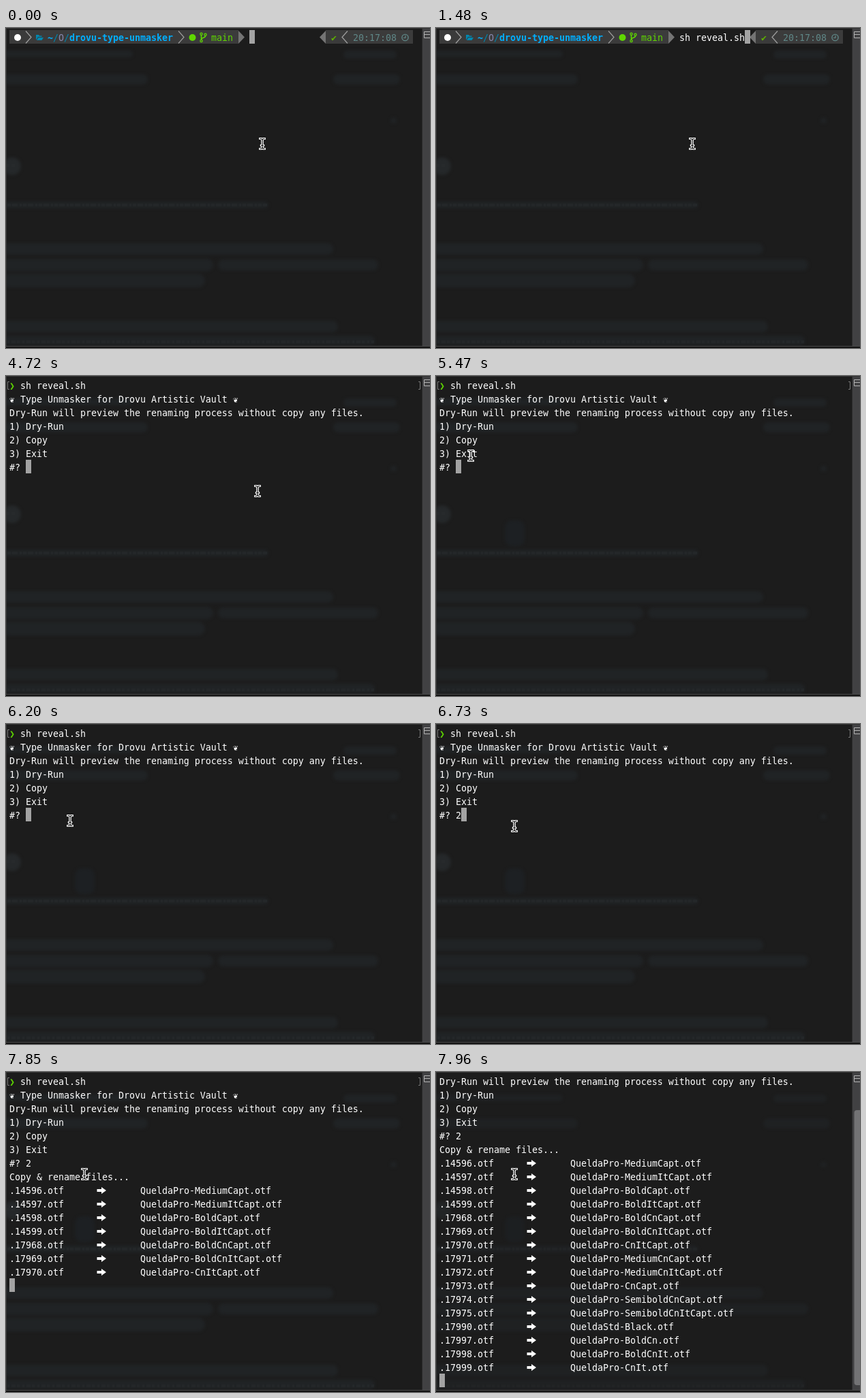
Write an HTML page that moves like this. It is 622 px wide and 470 px high and loops after 8 s.

```html
<!DOCTYPE html>
<html lang="en">
<head>
<meta charset="utf-8">
<title>Terminal session</title>
<style>
  html, body { margin: 0; width: 100%; height: 100%; overflow: hidden; background: #1c1c1c; }
  svg { display: block; width: 622px; height: 470px; }
  text { font: 13.29px "DejaVu Sans Mono", "Liberation Mono", monospace; white-space: pre; }
  .bold { font-weight: bold; }
  .leaf { font-size: 12px; }
  .blur { filter: blur(2px); }
</style>
</head>
<body>
<svg viewBox="0 0 622 470" xmlns="http://www.w3.org/2000/svg">
  <rect width="622" height="470" fill="#1c1c1c"/>
  <g id="haze"></g>
  <g id="screen"></g>
  <g id="bar">
    <rect x="610" width="12" height="470" fill="#414143"/>
    <path d="M610.5 0V467" stroke="#2b2b2c"/>
    <rect id="thumb" x="613.5" y="56" width="12" height="404" rx="4" fill="#737375"/>
    <path d="M622 5.5H613.5V14.5H622M613.5 9.5H622" fill="none" stroke="#b4b4b4"/>
  </g>
  <path d="M.5 0V467M0 .5H622" stroke="#343434" fill="none"/>
  <path d="M0 467.5H622" stroke="#4c4c4c"/>
  <rect y="468" width="622" height="2" fill="#121212"/>
  <g id="mouse" fill="none" stroke-linecap="square">
    <path id="beam" d="M-3-7.5Q0-7.5 0-5Q0-7.5 3-7.5M0-5V5M-3 7.5Q0 7.5 0 5Q0 7.5 3 7.5M-1.5 2.5H1.5" stroke="#fff" stroke-width="3.2"/>
    <use href="#beam"/>
    <path d="M-3-7.5Q0-7.5 0-5Q0-7.5 3-7.5M0-5V5M-3 7.5Q0 7.5 0 5Q0 7.5 3 7.5M-1.5 2.5H1.5" stroke="#151515" stroke-width="1.2"/>
  </g>
</svg>
<script>
const LOOP = 8000, COL = 8, ROW = 20, ROWS = 23;
const $ = id => document.getElementById(id);
const esc = s => s.replace(/&/g, '&amp;').replace(/</g, '&lt;');

const colX = col => 5 + col * COL;
const text = (col, row, s, fill = '#fff', cls = '') =>
  `<text x="${colX(col)}" y="${19 + row * ROW}" fill="${fill}" class="${cls}">${esc(s)}</text>`;
const cursor = (col, row) =>
  `<rect x="${colX(col)}" y="${3 + row * ROW}" width="8" height="20" fill="#a3a3a3"/>`;
const line = (d, stroke, w = 1.2) =>
  `<path d="${d}" fill="none" stroke="${stroke}" stroke-width="${w}"/>`;
const shape = (d, fill) => `<path d="${d}" fill="${fill}"/>`;

// Blurred window behind the terminal: x, y, width, height
const smudges = [
  [-4, 33, 190, 10], [495, 33, 78, 12], [-4, 68, 212, 15], [480, 68, 98, 15],
  [564, 132, 9, 8], [-6, 255, 391, 10], [-6, 316, 486, 17], [-6, 339, 310, 18],
  [311, 340, 235, 16], [-6, 361, 298, 20], [-6, 430, 493, 17], [-6, 452, 547, 14]
];
const smudge = ([x, y, w, h]) =>
  `<rect x="${x}" y="${y}" width="${w}" height="${h}" rx="${h / 2}"/>`;
$('haze').innerHTML =
  `<g class="blur" fill="#202325">${smudges.map(smudge).join('')}
   <circle cx="9" cy="203" r="13" fill="#25282a"/>
   <rect id="spot" x="101" y="212" width="29" height="38" rx="10" fill="#1d2023"/></g>
   <g fill="none" stroke="#292c2e" stroke-width="4" opacity=".55">
   <path d="M2 260H383" stroke-dasharray="5 2 8 3 3 2"/>
   <path d="M2 461H540" stroke-dasharray="3 3 6 2 4 4"/>
   <path d="M0 202H13" stroke-dasharray="5 3"/></g>`;

const BAR = '#3b3b3b', TIP = '#747474', SEP = '#a0a0a0';
const BLUE = '#0087af', SKY = '#00afff', GREEN = '#5fd700', TEAL = '#5f8787';
const prompt = [
  `<rect x="5" y="3" width="336" height="20" fill="${BAR}"/>`,
  `<rect x="469" y="3" width="128" height="20" fill="${BAR}"/>`,
  shape('M341 4L350 13.5L341 23Z', TIP),
  shape('M469 4L460 13.5L469 23Z', TIP),
  '<circle cx="17" cy="14" r="5" fill="#fff"/>',
  line('M29 4.5L37 13.5L29 22.5M253 4.5L261 13.5L253 22.5M501 4.5L493 13.5L501 22.5', SEP),
  shape('M44 17V10H48L49 11.5H52.5V13H47L44.5 17ZM45 18L47.5 14H55L52.5 18Z', BLUE),
  text(7, 0, '~', SKY, 'bold'), text(8, 0, '/', BLUE),
  text(9, 0, 'O', '#8787af'), text(10, 0, '/', BLUE),
  text(11, 0, 'drovu-type-unmasker', SKY, 'bold'),
  `<circle cx="273.5" cy="14" r="5" fill="${GREEN}"/>`,
  line('M286.5 9.5V18.5M292.5 10.5V11.5Q292.5 13.5 289 14.5Q286.5 15.2 286.5 17', GREEN, 1.6),
  `<g fill="${BAR}" stroke="${GREEN}" stroke-width="1.3"><circle cx="286.5" cy="8.7" r="1.6"/>
   <circle cx="292.5" cy="9.7" r="1.6"/><circle cx="286.5" cy="19" r="1.6"/></g>`,
  text(37, 0, 'main', GREEN),
  text(59, 0, '✔', '#5faf00'),
  text(63, 0, '20:17:08', TEAL),
  `<circle cx="585.5" cy="14" r="4.6" fill="none" stroke="${TEAL}" stroke-width="1.4"/>`,
  line('M586 11V14.5H583', TEAL)
].join('');

const command = 'sh reveal.sh';
const typing = [[420, 1], [470, 2], [710, 3], [880, 4], [1480, 12]];

function promptView(t) {
  let n = 0;
  for (const [at, count] of typing) if (t >= at) n = count;
  let out = prompt + text(44, 0, command.slice(0, n)) + cursor(44 + n, 0);
  if (n && n < command.length) {
    out += text(44 + n, 0, command[n], '#303030') +
      text(45 + n, 0, command.slice(n + 1), '#6a6a6a');
  }
  return out;
}

const fonts = `14596 Pro-MediumCapt,14597 Pro-MediumItCapt,14598 Pro-BoldCapt,
14599 Pro-BoldItCapt,17968 Pro-BoldCnCapt,17969 Pro-BoldCnItCapt,17970 Pro-CnItCapt,
17971 Pro-MediumCnCapt,17972 Pro-MediumCnItCapt,17973 Pro-CnCapt,
17974 Pro-SemiboldCnCapt,17975 Pro-SemiboldCnItCapt,17990 Std-Black,
17997 Pro-BoldCn,17998 Pro-BoldCnIt,17999 Pro-CnIt`
  .split(',').map(s => s.trim().split(' '));

const arrow = row =>
  shape(`M133.5 ${12 + row * ROW}h6.5v-3l7 5l-7 5v-3h-6.5z`, '#fff');

const menu = [
  row => line('M5 8.5H2.5V19.5H5M605 8.5H607.5V19.5H605', '#777', 1) +
    text(0, row, '❯', GREEN, 'bold') + text(2, row, command),
  row => text(0, row, '❦', '#fff', 'leaf') + text(41, row, '❦', '#fff', 'leaf') +
    text(2, row, 'Type Unmasker for Drovu Artistic Vault'),
  ...['Dry-Run will preview the renaming process without copy any files.',
    '1) Dry-Run', '2) Copy', '3) Exit'].map(s => row => text(0, row, s))
];

const fileRow = ([id, style]) => row =>
  text(0, row, `.${id}.otf`) + arrow(row) + text(24, row, `Quelda${style}.otf`);

const filesAt = t => t < 7690 ? 0 : Math.min(16, 1 + 3 * Math.floor((t - 7690) / 54));

function menuView(t) {
  const count = filesAt(t), answered = t >= 6730;
  const rows = [...menu, row => text(0, row, answered ? '#? 2' : '#? ')];
  if (count) {
    rows.push(row => text(0, row, 'Copy & rename files...'));
    rows.push(...fonts.slice(0, count).map(fileRow), row => cursor(0, row));
  }
  const skip = Math.max(0, rows.length - ROWS);
  let out = rows.slice(skip).map((draw, i) => draw(i)).join('');
  if (!count) out += cursor(answered ? 4 : 3, 6);
  return out;
}

// Pointer path: step, x, y
const STEP = 57.3;
const path = [
  [-1, 376, 170], [0, 369, 169], [3, 312, 161], [6, 205, 142], [9, 103, 125],
  [13, 51, 117], [17, 39, 103], [20, 41, 107], [23, 62, 123], [26, 94, 142],
  [28, 107, 150], [30, 115, 150]
];
function pointer(t) {
  const k = t < 4720 ? -1 : Math.min(30, Math.floor((t - 4720) / STEP + 0.2));
  const i = Math.max(1, path.findIndex(p => p[0] >= k));
  const [k0, x0, y0] = path[i - 1], [k1, x1, y1] = path[i];
  const f = (k - k0) / (k1 - k0);
  return [x0 + (x1 - x0) * f, y0 + (y1 - y0) * f].map(Math.round);
}

let shown = '';
function render(t) {
  const view = t < 2860 ? promptView(t) : menuView(t);
  if (view !== shown) $('screen').innerHTML = shown = view;
  const scrolled = filesAt(t) === fonts.length;
  const [x, y] = pointer(t);
  $('mouse').setAttribute('transform', `translate(${x} ${y})`);
  $('thumb').setAttribute('visibility', scrolled ? 'visible' : 'hidden');
  $('spot').setAttribute('visibility', t >= 5000 ? 'visible' : 'hidden');
  $('haze').setAttribute('opacity', scrolled ? 0.75 : 1);
}

const start = performance.now();
function tick() {
  render((performance.now() - start) % LOOP);
  requestAnimationFrame(tick);
}
tick();
</script>
</body>
</html>
```
